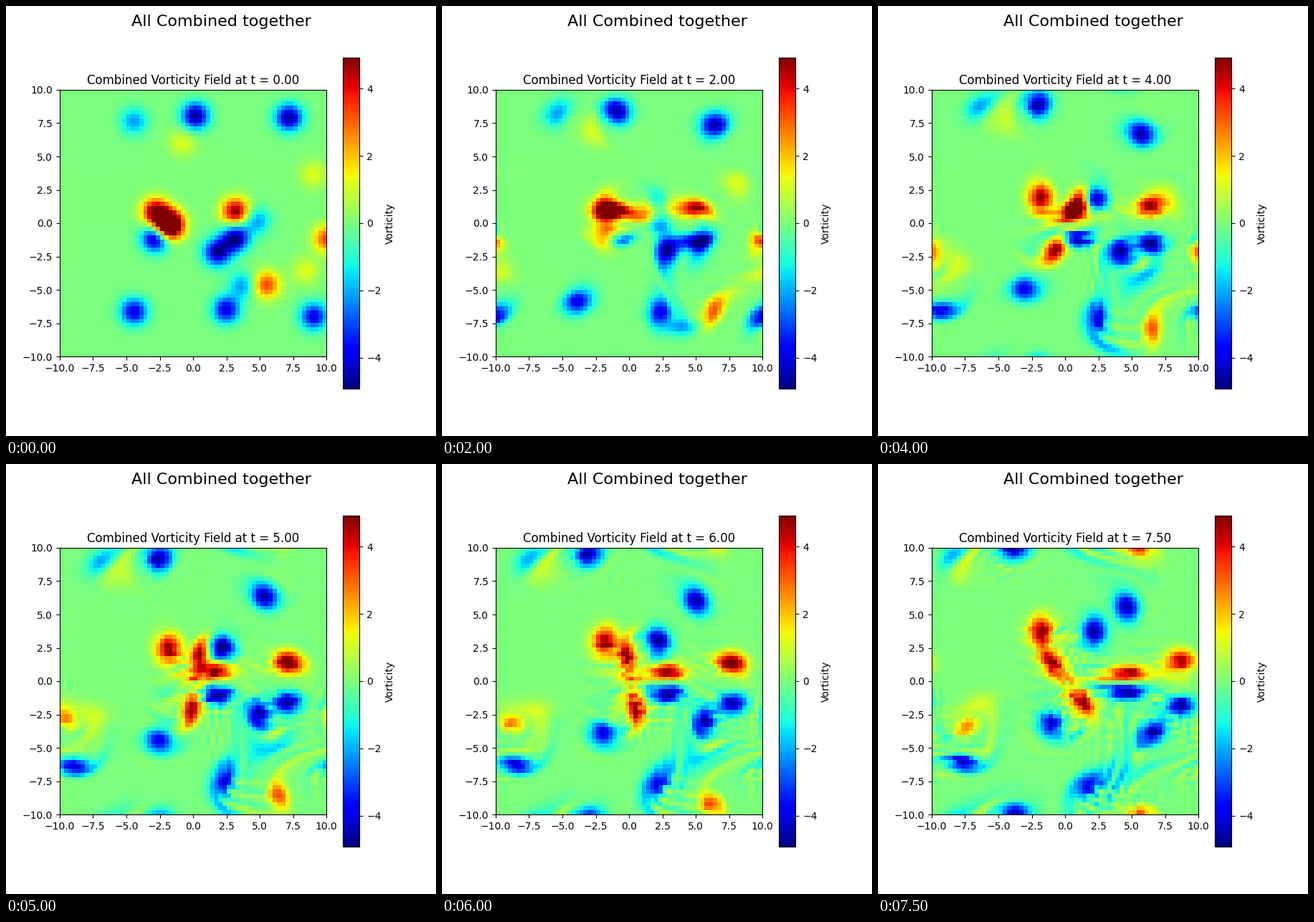
A matplotlib script for the animation above (8000 ms loop, 600 by 600 pixels).

```python
import numpy as np
import matplotlib.pyplot as plt
from matplotlib.animation import FuncAnimation

N, L, NU = 64, 20.0, 0.001
DX = L / N
FRAMES, FRAME_DT, SUBSTEPS = 16, 0.5, 10

axis = -L / 2 + (np.arange(N) + 0.5) * DX
X, Y = np.meshgrid(axis, -axis)  # first row is the top
k = 2 * np.pi * np.fft.fftfreq(N, DX)
K2 = k[:, None] ** 2 + k[None, :] ** 2
K2[0, 0] = 1.0


def blob(x, y):
    return np.exp(-(X - x) ** 2 - (Y - y) ** 2)


def node_blob(x, y):
    """Blob placed relative to the grid nodes, half a cell off the centres."""
    return blob(x + DX / 2, y - DX / 2)


def ddx(f):
    return (np.roll(f, -1, 2) - np.roll(f, 1, 2)) / (2 * DX)


def ddy(f):
    return (np.roll(f, 1, 1) - np.roll(f, -1, 1)) / (2 * DX)


def laplacian(f):
    near = sum(np.roll(f, s, a) for s in (1, -1) for a in (1, 2))
    return (near - 4 * f) / DX ** 2


def rhs(w):
    w_hat = np.fft.fft2(w)
    w_hat[:, 0, 0] = 0
    psi = np.fft.ifft2(-w_hat / K2).real
    return ddy(psi) * ddx(w) - ddx(psi) * ddy(w) + NU * laplacian(w)


def rk4(w, dt):
    a = rhs(w)
    b = rhs(w + dt / 2 * a)
    c = rhs(w + dt / 2 * b)
    d = rhs(w + dt * c)
    return w + dt / 6 * (a + 2 * b + 2 * c + d)


left, right = node_blob(-2, 0), node_blob(2, 0)
same = 5 * (left + right)
opposite = 5 * (left - right)
dipoles = sum(5 * s * node_blob(x, s) for x in (-3, 3) for s in (1, -1))

# Centres of the scattered vortices, grouped by strength
groups = {
    -4.8: [(0.15, 8), (7.15, 7.87), (1.8, -2.2)],
    -4.1: [(2.45, -6.5), (9, -7), (-4.45, -6.65)],
    -2.2: [(-4.46, 7.6), (3.65, -4.7), (4.75, 0.15)],
    1.2: [(-0.8, 6), (8.95, 3.6), (8.4, -3.6)],
    3.4: [(10, -1.2), (5.45, -4.65)],
}
scattered = sum(a * blob(*p) for a, points in groups.items() for p in points)

# Four independent flows, advanced together and shown as their sum
flows = np.array([same, opposite, dipoles, scattered])
limit = np.abs(opposite).max()

fields = [flows.sum(0)]
for _ in range(FRAMES - 1):
    for _ in range(SUBSTEPS):
        flows = rk4(flows, FRAME_DT / SUBSTEPS)
    fields.append(flows.sum(0))

fig, ax = plt.subplots(figsize=(6, 6), dpi=100)
fig.suptitle("All Combined together", fontsize=16)
im = ax.imshow(fields[0], extent=[-10, 10, -10, 10], cmap="jet",
               vmin=-limit, vmax=limit)
fig.colorbar(im, ax=ax, label="Vorticity")
title = ax.set_title("")


def update(i):
    im.set_data(fields[i])
    title.set_text(f"Combined Vorticity Field at t = {i * FRAME_DT:.2f}")
    return im, title


anim = FuncAnimation(fig, update, frames=FRAMES, interval=500,
                     repeat=True, repeat_delay=0)
plt.show()
```
